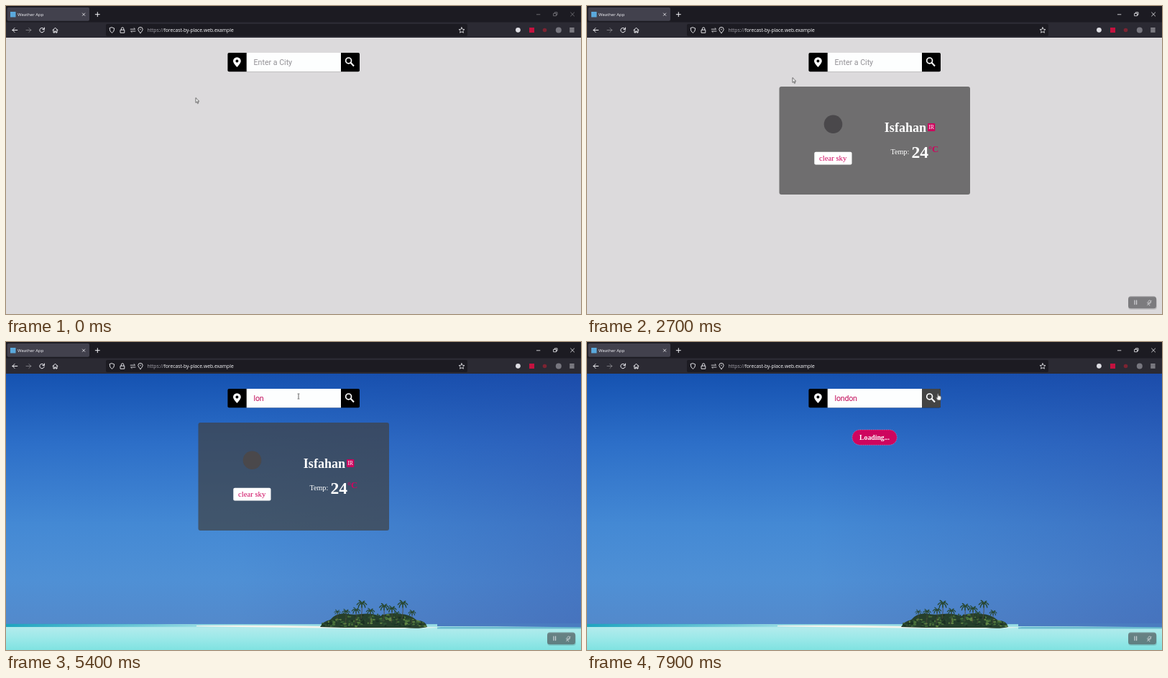
Recreate the animation shown at these times as an HTML page. Size 800 by 428 pixels, loop 8 s.

```html
<!DOCTYPE html>
<html lang="en">
<head>
<meta charset="utf-8">
<title>Weather App</title>
<style>
html, body { margin: 0; width: 100%; height: 100%; overflow: hidden; background: #dcdadc; }
svg { display: block; width: 100vw; height: 100vh; }
.ui { font-family: "Open Sans", "Noto Sans", sans-serif; }
.field { font: 10.6px Roboto, "Liberation Sans", sans-serif; }
.serif { font-family: "Liberation Serif", "Noto Serif", serif; }
.bold { font-weight: 700; }
.line { fill: none; stroke: #f4f4f8; stroke-width: 1; stroke-linecap: round; stroke-linejoin: round; }

/* every track shares one 8 s clock */
.a { animation: 8s step-end infinite; }
.smooth { animation-timing-function: linear; }

.controls { animation-name: controls; }
.widget { animation-name: widget; }
.photo { animation-name: photo; }
.card { animation-name: card; }
.loading { animation-name: loading; }
.pin-hover { animation-name: pinHover; }
.find-hover { animation-name: findHover; }
.hint { animation-name: hint; }
.caret { animation-name: caret; }
.cursor { animation-name: cursor; }
.arrow { animation-name: arrow; }
.beam { animation-name: beam; }
.hand { animation-name: hand; }
.k1 { animation-name: k1; } .k2 { animation-name: k2; } .k3 { animation-name: k3; }
.k4 { animation-name: k4; } .k5 { animation-name: k5; } .k6 { animation-name: k6; }

@keyframes controls { 0% { opacity: .45 } 11.2%, 100% { opacity: 1 } }
@keyframes widget { 0%, 1.2% { opacity: 0 } 6%, 100% { opacity: 1 } }
@keyframes photo { 0% { opacity: 0 } 34.95%, 100% { opacity: 1 } }
@keyframes card { 0%, 27% { opacity: 0 } 30%, 91.2% { opacity: 1 } 92.4%, 100% { opacity: 0 } }
@keyframes loading { 0% { opacity: 0 } 12.45% { opacity: 1 } 27.45% { opacity: 0 } 92.45%, 100% { opacity: 1 } }
@keyframes pinHover { 0%, 8.5% { opacity: 0 } 10%, 13.5% { opacity: 1 } 15.5%, 100% { opacity: 0 } }
@keyframes findHover { 0%, 88% { opacity: 0 } 89.5%, 100% { opacity: 1 } }
@keyframes hint { 0% { opacity: 1 } 57.45%, 100% { opacity: 0 } }
@keyframes k1 { 0% { opacity: 0 } 57.45%, 100% { opacity: 1 } }
@keyframes k2 { 0% { opacity: 0 } 59.95%, 100% { opacity: 1 } }
@keyframes k3 { 0% { opacity: 0 } 62.45%, 100% { opacity: 1 } }
@keyframes k4 { 0% { opacity: 0 } 71.2%, 100% { opacity: 1 } }
@keyframes k5 { 0% { opacity: 0 } 74.95%, 100% { opacity: 1 } }
@keyframes k6 { 0% { opacity: 0 } 78.7%, 100% { opacity: 1 } }
@keyframes caret {
  0% { opacity: 0; transform: translateX(344.6px) }
  46.2% { opacity: 1; transform: translateX(344.6px) }
  51.2% { opacity: 0; transform: translateX(344.6px) }
  57.45% { opacity: 1; transform: translateX(347.2px) }
  59.95% { opacity: 1; transform: translateX(353px) }
  62.45% { opacity: 1; transform: translateX(358.7px) }
  66.2% { opacity: 0; transform: translateX(358.7px) }
  71.2% { opacity: 1; transform: translateX(364.5px) }
  74.95% { opacity: 1; transform: translateX(370.3px) }
  78.7% { opacity: 1; transform: translateX(376px) }
  82.45% { opacity: 0; transform: translateX(376px) }
  84.95% { opacity: 1; transform: translateX(376px) }
  91.2%, 100% { opacity: 0; transform: translateX(376px) }
}
@keyframes cursor {
  0%, 1.2% { transform: translate(264px, 127.5px) }
  11.2%, 12.5% { transform: translate(319px, 78px) }
  19.9%, 35.1% { transform: translate(286px, 99.5px) }
  42.5% { transform: translate(396px, 97px) }
  46.2%, 85.1% { transform: translate(407px, 75.5px) }
  88.75%, 91.2% { transform: translate(479px, 79px) }
  98.7%, 100% { transform: translate(488.3px, 71.5px) }
}
@keyframes arrow { 0% { opacity: 1 } 9.2% { opacity: 0 } 14.5% { opacity: 1 } 43.6%, 100% { opacity: 0 } }
@keyframes beam { 0% { opacity: 0 } 43.6% { opacity: 1 } 88%, 100% { opacity: 0 } }
@keyframes hand { 0% { opacity: 0 } 9.2% { opacity: 1 } 14.5% { opacity: 0 } 88%, 100% { opacity: 1 } }
</style>
</head>
<body>
<svg viewBox="0 0 800 428" preserveAspectRatio="none">
  <defs>
    <linearGradient id="sky" x2="0" y2="1">
      <stop offset="0" stop-color="#1552b1"/>
      <stop offset=".28" stop-color="#2d6fc8"/>
      <stop offset=".6" stop-color="#4489d4"/>
      <stop offset=".82" stop-color="#4f90d5"/>
      <stop offset="1" stop-color="#5389cb"/>
    </linearGradient>
    <linearGradient id="shade">
      <stop offset=".4" stop-color="#2a3f9c" stop-opacity="0"/>
      <stop offset="1" stop-color="#2a3f9c" stop-opacity=".3"/>
    </linearGradient>
    <linearGradient id="sea" x2="0" y2="1">
      <stop offset="0" stop-color="#8ad2de"/>
      <stop offset=".14" stop-color="#b2ebec"/>
      <stop offset=".5" stop-color="#9ee9e9"/>
      <stop offset="1" stop-color="#80e2e1"/>
    </linearGradient>
    <linearGradient id="deep">
      <stop offset="0" stop-color="#1fa4bf"/>
      <stop offset="1" stop-color="#1fa4bf" stop-opacity="0"/>
    </linearGradient>
    <g id="palm" fill="none" stroke-linecap="round">
      <path d="M0 0Q1 9 -1 22" stroke="#4f4a3a" stroke-width=".9"/>
      <path d="M0 0Q-4 -4 -7 1M0 0Q-4 -1 -5 5M0 0Q4 -4 7 1M0 0Q4 -1 5 5M0 0Q-1 -4 -4 -5M0 0Q2 -4 4 -4M0 0V5" stroke="#27462f" stroke-width="1.5"/>
    </g>
  </defs>

  <rect y="44" width="800" height="384" fill="#dcdadc"/>

  <g class="a photo">
    <rect y="44" width="800" height="350" fill="url(#sky)"/>
    <rect y="44" width="800" height="350" fill="url(#shade)"/>
    <rect y="392" width="800" height="36" fill="url(#sea)"/>
    <path d="M0 391.7H200L290 394V396H0Z" fill="url(#deep)"/>
    <path d="M600 391H800V396.5Q700 395 600 395Z" fill="#4a7cc0"/>
    <path d="M600 396H800V398.4H600Z" fill="#3f9fbe" opacity=".6"/>
    <path d="M265 394Q350 393 440 395L605 396.5Q560 399.5 440 397.5L265 395.2Z" fill="#f3f4ec"/>
    <path d="M437 396Q441 388 451 386Q457 378 470 377Q482 380 494 378Q508 376 520 381Q534 375 548 378Q562 378 572 387Q584 387 586 396Q575 399 555 397L470 397Z" fill="#263f2b"/>
    <g id="leaves"></g>
    <g id="palms"></g>
  </g>

  <g class="a smooth card">
    <rect x="267.5" y="112" width="265.5" height="150" rx="3" fill="rgb(65 65 65 / .7)"/>
    <circle cx="342.5" cy="164.3" r="12.8" fill="#4a484b"/>
    <rect x="316.3" y="202.8" width="52.2" height="17.6" rx="2" fill="#fff"/>
    <g class="serif" fill="#fff">
      <text x="323" y="215" font-size="10.7" fill="#ce055e">clear sky</text>
      <text x="413.8" y="174.6" font-size="18.1" class="bold">Isfahan</text>
      <rect x="474" y="163" width="10.3" height="11" rx="1" fill="#ce055e"/>
      <text x="475.2" y="171.3" font-size="7.8">IR</text>
      <text x="422.4" y="206" font-size="10.2">Temp:</text>
      <text x="451.4" y="211" font-size="23.6" class="bold">24</text>
      <text x="475" y="202.6" font-size="12.8" class="bold" fill="#ce055e">°C</text>
    </g>
  </g>

  <g class="a loading">
    <rect x="369" y="122" width="62.3" height="21.2" rx="10.6" fill="#ce055e" stroke="#e591b8" stroke-width=".6" stroke-dasharray="1.4 1.2"/>
    <text class="serif bold" x="379" y="135.8" font-size="9.75" fill="#fff">Loading...</text>
  </g>

  <!-- search bar -->
  <rect x="308.4" y="65" width="183.6" height="26.3" rx="2"/>
  <rect x="334.7" y="65" width="131.3" height="26.3" fill="#fdfefe"/>
  <path class="a smooth pin-hover" d="M310.4 65H334.7V91.3H310.4Q308.4 91.3 308.4 89.3V67Q308.4 65 310.4 65Z" fill="#444"/>
  <path class="a smooth find-hover" d="M466 65H490Q492 65 492 67V89.3Q492 91.3 490 91.3H466Z" fill="#444"/>
  <path d="M321.4 85Q316 79.5 316 76.6A5.4 5.4 0 0 1 326.8 76.6Q326.8 79.5 321.4 85ZM321.4 74.6a2 2 0 1 0 .01 0Z" fill="#fff" fill-rule="evenodd"/>
  <g fill="none" stroke="#fff">
    <circle cx="476.6" cy="75.9" r="3.9" stroke-width="1.7"/>
    <path d="M479.5 78.8L484 83.4" stroke-width="2.1"/>
  </g>
  <text class="field a hint" x="344.6" y="82" fill="#929095">Enter a City</text>
  <g class="field" id="typed" fill="#c20a58"></g>
  <rect class="a caret" y="72" width=".8" height="12" fill="#c20a58"/>

  <!-- browser frame -->
  <rect width="800" height="44" fill="#2b2a33"/>
  <rect width="800" height="22.5" fill="#1c1b22"/>
  <rect x="1.5" y="2" width="114.5" height="18.7" rx="2" fill="#42414d"/>
  <rect x="139" y="25" width="503" height="17" rx="2" fill="#1c1b22"/>
  <rect x="6" y="8" width="7.5" height="7.5" fill="#5aa9dc"/>
  <g class="ui">
    <text x="16" y="14.1" font-size="6" fill="#f2f2f6">Weather App</text>
    <text x="196.4" y="36.3" font-size="6.75" fill="#a5a4ac">https://<tspan fill="#fbfbfe">forecast-by-place.web.example</tspan></text>
  </g>
  <g class="line">
    <path d="M106.4 10l3.4 3.4m0-3.4l-3.4 3.4" stroke-width=".8"/>
    <path d="M124.3 11.7h6m-3-3v6"/>
    <path d="M15.8 33.5H9m3-3l-3 3l3 3"/>
    <path d="M28 33.5h6.8m-3-3l3 3l-3 3" opacity=".38"/>
    <path d="M53 32.3a3.2 3.2 0 1 0 .2 2M53.4 30v2.6h-2.6"/>
    <path d="M65 33.7l3.5-3.5l3.5 3.5M66 33v4h1.7v-2h1.6v2H71v-4"/>
    <path d="M147.4 29.8l3.3 1.2q0 4.8-3.3 6.4q-3.3-1.6-3.3-6.4Z" stroke-width=".9"/>
    <path d="M159.4 33.2h5.4v4h-5.4ZM160.4 33v-1.5a1.7 1.7 0 0 1 3.4 0V33" stroke-width=".9"/>
    <path d="M173.2 32.2h6.4l-1.5-1.5M180 35h-6.4l1.5 1.5" stroke-width=".8"/>
    <path d="M187 37.6q-3.2-3.2-3.2-5a3.2 3.2 0 0 1 6.4 0q0 1.8-3.2 5ZM187 32v1" stroke-width=".9"/>
    <path d="M634 29.8l1.1 2.5l2.8.3l-2.1 1.9l.6 2.7l-2.4-1.4l-2.4 1.4l.6-2.7l-2.1-1.9l2.8-.3Z" stroke-width=".8"/>
    <path d="M784.6 31h5.6m-5.6 2.4h5.6m-5.6 2.4h5.6" stroke-width=".9"/>
  </g>
  <circle cx="712.4" cy="33.3" r="3.4" fill="#dedee4"/>
  <rect x="728" y="30" width="7" height="7" fill="#c4123f"/>
  <circle cx="749.5" cy="33.5" r="2.8" fill="#7c2432"/>
  <circle cx="768.8" cy="33.5" r="4" fill="#77767f"/>
  <path class="line a controls" d="M738.3 11.8h4.6M762 10.2h3.5v3.5H762ZM763.4 10V8.8h3.6v3.5h-1.2M785.6 9l5 5m0-5l-5 5" style="stroke-width:.8"/>

  <!-- recorder controls -->
  <g class="a smooth widget">
    <rect x="753" y="405" width="40" height="17" rx="4" fill="#000" opacity=".12"/>
    <rect x="753" y="403.6" width="39" height="16.6" rx="3.5" fill="rgb(75 75 78 / .58)"/>
    <g class="line" opacity=".7">
      <path d="M762 409.2v5.4m2.6-5.4v5.4" stroke-width="1.2"/>
      <path d="M781 410.4a1.8 1.8 0 0 1 3.5 0v1.6a1.8 1.8 0 0 1-3.5 0ZM779.5 412q.3 3 3.2 3.2v1M779.6 415.8l5.6-6.5" stroke-width=".8"/>
    </g>
  </g>

  <g class="a smooth cursor" fill="#fff" stroke="#222" stroke-linejoin="round">
    <path class="a arrow" d="M0 0V6.9L1.5 5.5L2.6 8L3.7 7.5L2.6 5.1H4.7Z" stroke-width=".65"/>
    <path class="a beam" d="M-1.4 -3.6H-.4L0 -3.2L.4 -3.6H1.4M0 -3.2V3.2M-1.4 3.6H-.4L0 3.2L.4 3.6H1.4" fill="none" stroke-width=".7"/>
    <path class="a hand" d="M-.8 .6Q0 -.5 .8 .6V3.2Q1.6 2.7 2.2 3.5Q3 3.1 3.4 3.9Q4.3 3.7 4.4 4.7V7Q4.3 8.2 3.5 9.5H-.4Q-1.6 7.6 -2.6 5.9Q-2.3 4.7 -.8 6Z" stroke-width=".6"/>
  </g>
</svg>
<script>
const NS = "http://www.w3.org/2000/svg";
const add = (parent, tag, attrs) => {
  const el = document.createElementNS(NS, tag);
  for (const k in attrs) el.setAttribute(k, attrs[k]);
  return document.getElementById(parent).appendChild(el);
};

// one text element per typed letter, each with its own appearing time
const advance = [2.4, 5.8, 5.7, 5.8, 5.8, 5.7];
let x = 344.6;
[..."london"].forEach((ch, i) => {
  add("typed", "text", { x, y: 82, class: "a k" + (i + 1) }).textContent = ch;
  x += advance[i];
});

// foliage
let seed = 11;
const rnd = () => (seed = (seed * 16807) % 2147483647) / 2147483647;
const greens = ["#1a3023", "#2f5233", "#47703a", "#5f8444", "#223c29"];
for (let i = 0; i < 190; i++) {
  const u = rnd() * 2 - 1;
  const top = 378 + 13 * u * u;
  add("leaves", "ellipse", {
    cx: 512 + u * 72, cy: top + rnd() * (395 - top),
    rx: .8 + rnd() * 1.7, ry: .6 + rnd(),
    fill: greens[Math.floor(rnd() * greens.length)]
  });
}

const palms = [[461, 375, .6], [473, 375, .75], [487, 373, .8], [495, 364, .95], [507, 374, .8],
  [526, 368, .9], [537, 371, .85], [552, 364, .95], [544, 377, .65], [565, 376, .7]];
for (const [px, py, s] of palms)
  add("palms", "use", { href: "#palm", transform: `translate(${px} ${py}) scale(${s})` });
</script>
</body>
</html>
```
